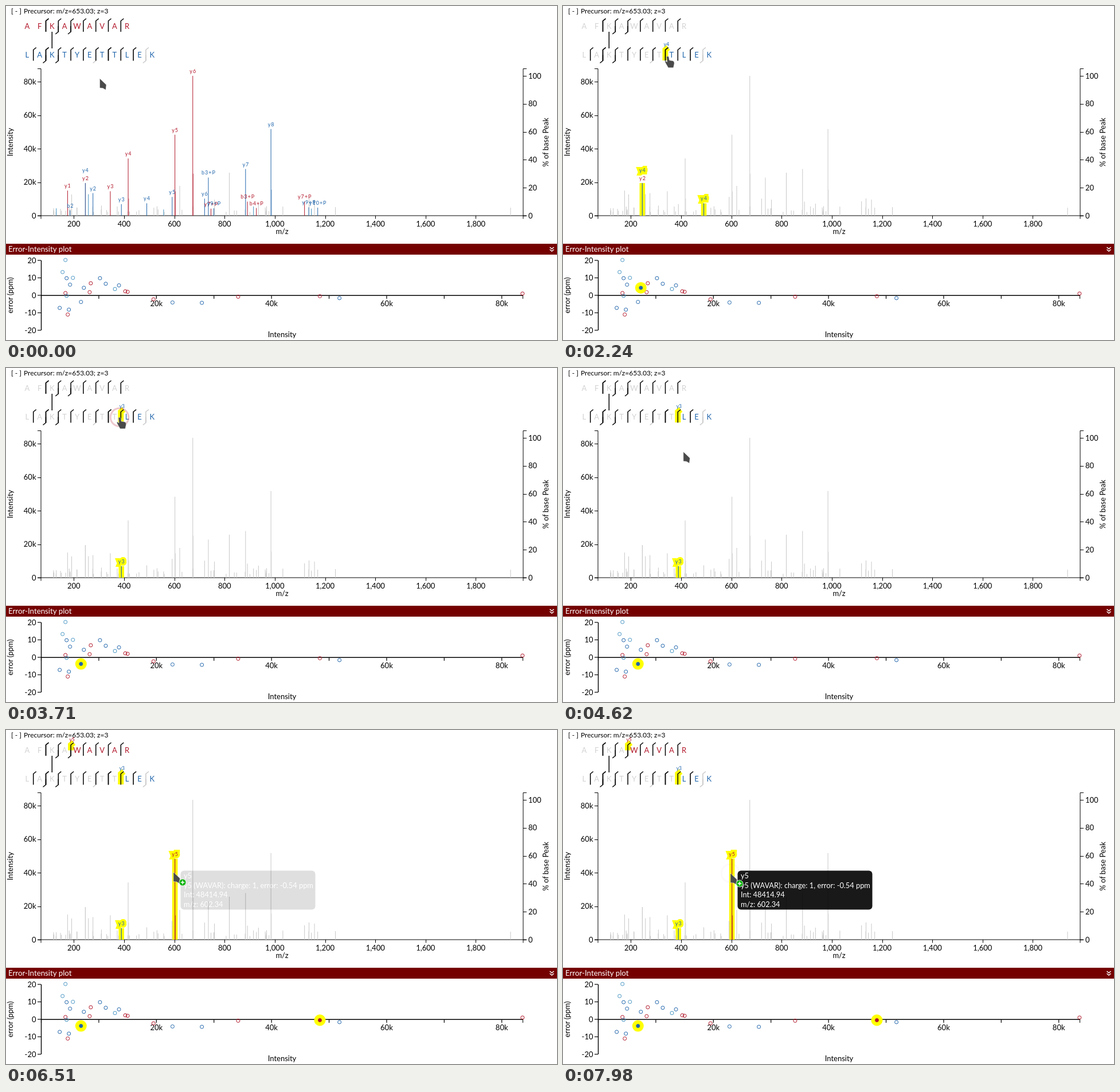
Animation, 961 px wide and 583 px high, one loop 8000 ms. Source, as an HTML page:

```html
<!DOCTYPE html>
<html lang="en">
<head>
<meta charset="utf-8">
<title>Spectrum viewer</title>
<style>
html, body { margin: 0; width: 100%; height: 100%; overflow: hidden; background: #fff; }
svg { display: block; width: 961px; height: 583px; font: 13px Lato, sans-serif; }
.frag { font-size: 9px; letter-spacing: 1px; text-anchor: middle; }
.hot { stroke: #ff0; stroke-width: 8px; paint-order: stroke; }
.mid { text-anchor: middle; }
.end { text-anchor: end; }
</style>
</head>
<body>
<svg viewBox="0 0 961 583" xmlns="http://www.w3.org/2000/svg">
  <g id="axes"></g>
  <g id="plot"></g>
  <g id="tip">
    <rect x="304.5" y="245.5" width="235" height="68" rx="6" fill="#000" fill-opacity=".9"/>
    <g fill="#fff" font-size="12.8">
      <text x="310" y="259">y5</text>
      <text x="310" y="276">y5 (WAVAR): charge: 1, error: -0.54 ppm</text>
      <text x="310" y="292">Int: 48414.94</text>
      <text x="310" y="309">m/z: 602.34</text>
    </g>
  </g>
  <circle id="ring" r="15.8" fill="none" stroke="#b2182b" stroke-width="3"/>
  <g id="cursor" stroke="#fff" stroke-opacity=".6" stroke-width=".8" fill="#4a4a4a">
    <path id="arrow" d="M0 0L11.5 11L10.5 20L5.5 17L0 16.5Z"/>
    <path id="hand" d="M-2 1Q0-1 2 1L3 7L9 8Q12 9 11.5 13L10 20H1L-3 13L-5 9Q-4 7-1 10Z"/>
    <g id="plus">
      <circle cx="16" cy="18" r="6" fill="#12b312" stroke-opacity="1"/>
      <path d="M12.8 18H19.2M16 14.8V21.2" stroke="#fff" stroke-opacity="1" stroke-width="1.5"/>
    </g>
  </g>
</svg>
<script>
const LOOP = 8000, STEP = 70;
const RED = '#b2182b', PINK = '#d6604d', BLUE = '#2166ac', PALE = '#4393c3', GREY = '#c8c8c8', FADED = '#d3d3d3';
const $ = id => document.getElementById(id);

// Scales: m/z and intensity (in thousands) above, intensity and ppm below
const mzX = mz => 118.3 + (mz - 200) * .43825;
const intY = k => 366 - k * 2.92;
const intX = k => 61.5 + k * 10.04;
const ppmY = e => 505 - e * 3.05;

const line = (x1, y1, x2, y2, color = '#000', w = 1) =>
  `<path d="M${x1} ${y1}L${x2} ${y2}" stroke="${color}" stroke-width="${w}" fill="none"/>`;
const text = (x, y, s, cls = '', attrs = '') => `<text x="${x}" y="${y}" class="${cls}" ${attrs}>${s}</text>`;
const upright = (x, y, s) => text(0, 0, s, 'mid', `transform="translate(${x} ${y}) rotate(-90)"`);
const crisp = v => Math.round(v) + .5;

function drawAxes() {
  let s = text(9, 12.5, '[ - ]', '', 'font-size="12"') +
    text(31, 12.5, 'Precursor: m/z=653.03; z=3', '', 'font-size="12"') +
    '<path d="M55 109.5H61V366H55M908 109.5H902V366H908M61 371.5V366H902V371.5" fill="none" stroke="#000"/>';

  for (let k = 0; k <= 80; k += 20) {
    const y = intY(k);
    s += line(55, crisp(y), 61, crisp(y)) + text(52.5, y + 4.5, k ? k + 'k' : 0, 'end');
  }
  for (let p = 0; p <= 100; p += 20) {
    const y = 366 - p * 2.44;
    s += line(902, crisp(y), 908, crisp(y)) + text(911, y + 4.5, p);
  }
  for (let mz = 200; mz <= 1800; mz += 200) {
    const x = mzX(mz);
    s += line(crisp(x), 366, crisp(x), 371.5) + text(x, 384.5, mz.toLocaleString('en-US'), 'mid');
  }
  s += text(481.5, 398, 'm/z', 'mid') + upright(12, 237.5, 'Intensity') + upright(946, 238, '% of base Peak');

  s += '<rect y="415" width="961" height="19" fill="#750000"/>' +
    text(4, 429, 'Error-Intensity plot', '', 'fill="#fff" font-size="13.3"') +
    '<path d="M948.5 421L952 424L955.5 421M948.5 425L952 428L955.5 425" fill="none" stroke="#fff" stroke-width="1.5"/>';

  s += line(61.5, 444, 61.5, 566, '#000', 1.4) + line(61, 505.2, 902, 505.2, '#000', 1.4) + line(901.5, 505, 901.5, 511);
  for (let e = -20; e <= 20; e += 10)
    s += line(55, ppmY(e), 61, ppmY(e), '#000', 1.2) + text(52.5, ppmY(e) + 4.5, e, 'end');
  for (let k = 0; k <= 80; k += 10) {
    s += line(intX(k), 505, intX(k), 511, '#000', 1.2);
    if (k && k % 20 === 0) s += text(intX(k), 523.5, k + 'k', 'mid');
  }
  return s + text(481.5, 577.5, 'Intensity', 'mid') + upright(12, 505, 'error (ppm)');
}

// Each ion: name[-neutral loss][/charge] intensity ppm. "+P" carries the other peptide on the linker.
const rows = [
  { id: 'R', seq: 'AFKAWAVAR', top: 22, color: RED, pale: PINK,
    ions: 'y1 15 2,y2 19.5 -2.3,y3 14.6 2.3,y4 34.2 -.8,y5 48.4 -.5,y6 83.6 1,' +
      'y7+P/3 4.2 1.3,b3+P/2 8.4 1.8,b4+P/2 4.6 -11,y7+P/2 8.6 6.9' },
  { id: 'B', seq: 'LAKTYETTLEK', top: 72.5, color: BLUE, pale: PALE,
    ions: 'b2 3.2 -7.2,y2 13.5 5.7,y4/2 19.5,y3 6.9 -3.8,y4 7.4 4.3,y5 11.2 6.6,y6 10.2 9.8,y7 27.9 -4.3,' +
      'y8 51.8 -1.6,b3+P/2 22.8 -4.1,y9+P/3 4.4 9.8,y9+P/2 5 6.1,y10+P/2 4.8 -8.2,' +
      'y1-17 4.4 -.3,y2-18 12.8 3.6,y5-34 3.7 13.3,b6+P-34/2 5.5 10,b10+P-18/2 4.2 20.2' }
];
const residue = { A: 71.037, E: 129.043, F: 147.068, K: 128.095, L: 113.084, R: 156.101, T: 101.048, V: 99.068, W: 186.079, Y: 163.063 };
const WATER = 18.011, PROTON = 1.007, LINKER = 138.068;
const mass = seq => [...seq].reduce((m, c) => m + residue[c], 0);

function parseIon(src, row, other) {
  const [name, k, ppm] = src.split(' ');
  const [, type, n, p, loss = 0, z = 1] = name.match(/^([by])(\d+)(\+P)?(?:-(\d+))?(?:\/(\d))?$/);
  const isY = type === 'y';
  let m = isY ? mass(row.seq.slice(-n)) + WATER : mass(row.seq.slice(0, n));
  if (p) m += mass(other.seq) + WATER + LINKER;
  return {
    type, bond: isY ? row.seq.length - n : +n, key: row.id + type + n,
    x: mzX((m - loss) / z + PROTON), k: +k, ppm,
    label: loss ? '' : type + n + (p || ''), color: loss ? row.pale : row.color
  };
}
rows.forEach((row, i) => {
  row.ions = row.ions.split(',').map(s => parseIon(s, row, rows[1 - i]));
});
const ions = rows.flatMap(r => r.ions);

// Unassigned peaks: a few tall ones, then a seeded crowd that thins out to the right
const noise = [[114.5, 12.7], [303, 17.8], [389.5, 25.7], [363.5, 9.6], [528.5, 10.3], [538, 9.6], [574.5, 5.1], [880, 4.8]];
let seed = 11;
const rand = () => (seed = seed * 16807 % 2147483647) / 2147483647;
for (let i = 0; i < 42; i++) noise.push([83 + 400 * rand() ** 1.5, 2.2 + 5 * rand() ** 2]);

function drawRow(row, active) {
  const key = active.find(k => k[0] === row.id);
  const chosen = row.ions.find(i => i.key === key);
  const bondX = n => 47.7 + (n - 1) * 21.8;
  const has = (type, bond) => row.ions.some(i => i.type === type && i.bond === bond && i.label);
  const { top } = row;
  let s = '';
  if (chosen) {
    const x = bondX(chosen.bond), low = top + (has('b', chosen.bond) ? 13.5 : 22.5);
    s += `<path d="M${x + 5} ${top}L${x} ${top + 4}V${low}" fill="none" stroke="#ff0" stroke-width="10"/>` +
      text(x + 2, top - 2.5, chosen.label, 'mid', `font-size="8.5" fill="${row.color}"`);
  }
  [...row.seq].forEach((c, i) => {
    const on = !active.length || (chosen && i >= chosen.bond);
    s += text(36.8 + i * 21.8, top + 17.5, c, 'mid', `fill="${on ? row.color : FADED}"`);
  });
  [...row.ions].sort((a, b) => !!a.label - !!b.label).forEach(i => {
    const d = i.type === 'y' ? 'M5 0L0 4V23' : 'M0 13V23L-5 27';
    s += `<path transform="translate(${bondX(i.bond)} ${top})" d="${d}" fill="none" stroke="${i.label ? '#000' : GREY}" stroke-width="1.5"/>`;
  });
  return s;
}

function drawPlot(active) {
  const hot = i => active.includes(i.key);
  const peak = (x, k, color, w) => line(x, 366, x, intY(k), color, w);
  let s = rows.map(r => drawRow(r, active)).join('') + line(80.3, 45, 80.3, 74, '#000', 1.5);

  ions.filter(hot).forEach(({ x, k }) => {
    s += `<rect x="${x - 4.8}" y="${intY(k)}" width="9.6" height="${k * 2.92}" fill="#ff0"/>`;
  });
  noise.forEach(([x, k]) => s += peak(x, k, GREY));
  ions.forEach(i => {
    const color = !active.length || hot(i) ? i.color : GREY;
    if (i.k > 30) s += `<g opacity=".6">${peak(i.x + .9, i.k * .3, color)}</g>`;
    s += peak(i.x, i.k, color, hot(i) ? 1.2 : 1);
  });

  ions.forEach((i, n) => {
    const same = j => Math.abs(j.x - i.x) < .5;
    const lift = ions.slice(0, n).some(same) ? 19 : 5;
    if (i.label && (!active.length || ions.some(j => hot(j) && same(j))))
      s += text(i.x + .5, intY(i.k) - lift, i.label, hot(i) ? 'frag hot' : 'frag', `fill="${i.color}"`);
  });

  ions.filter(i => i.ppm).forEach(i => {
    const at = `cx="${intX(i.k)}" cy="${ppmY(i.ppm)}"`;
    if (hot(i)) s += `<circle ${at} r="10" fill="#ff0"/>`;
    s += `<circle ${at} r="3" fill="${hot(i) ? i.color : 'none'}" stroke="${i.color}"/>`;
  });
  return s;
}

// Pointer moves: begin, end, x, y
const moves = [[140, 910, 181, 88], [2170, 2520, 196, 85], [2940, 3010, 198, 86], [4340, 4780, 215, 172],
  [4780, 5320, 244, 212], [5390, 6370, 292, 248], [6510, 6790, 292, 250]];
const clicks = [{ at: 3710, x: 198, y: 86 }, { at: 7350, x: 292, y: 250 }];

const clamp = v => Math.min(1, Math.max(0, v));
const smooth = k => k * k * (3 - 2 * k);
const cubic = k => k < .5 ? 4 * k ** 3 : 1 - 4 * (1 - k) ** 3;
const show = (id, v) => $(id).setAttribute('opacity', +v);

function pointer(t) {
  let x = 163.5, y = 126.5;
  for (const [t0, t1, toX, toY] of moves) {
    const k = smooth(clamp((t - t0) / (t1 - t0)));
    x += (toX - x) * k;
    y += (toY - y) * k;
  }
  return [x, y];
}

function activeAt(t) {
  if (t >= 6300) return ['By3', 'Ry5'];
  if (t >= 2450) return ['By3'];
  return t >= 700 && t < 2310 ? ['By4'] : [];
}

// A click ring fades in over three steps and out over six
function ringAlpha(age) {
  const n = age / STEP;
  return n < 0 ? 0 : .7 * clamp((n + 1) / 3) * clamp(1 - (n - 3) / 6.2);
}

let drawn = null;

function render(ms) {
  const t = Math.floor(ms / STEP) * STEP;
  const active = activeAt(t), key = active.join();
  if (key !== drawn) {
    $('plot').innerHTML = drawPlot(active);
    drawn = key;
  }
  const [x, y] = pointer(t);
  const hand = y < 98 && active.length > 0;
  $('cursor').setAttribute('transform', `translate(${x} ${y})`);
  show('hand', hand);
  show('arrow', !hand);
  show('plus', t >= 6300);
  show('tip', cubic(clamp((t - 6370) / 430)));
  const click = clicks[t < clicks[1].at ? 0 : 1];
  $('ring').setAttribute('cx', click.x);
  $('ring').setAttribute('cy', click.y);
  show('ring', ringAlpha(t - click.at));
}

$('axes').innerHTML = drawAxes();
const start = performance.now();
function tick() {
  render((performance.now() - start) % LOOP);
  requestAnimationFrame(tick);
}
tick();
</script>
</body>
</html>
```
